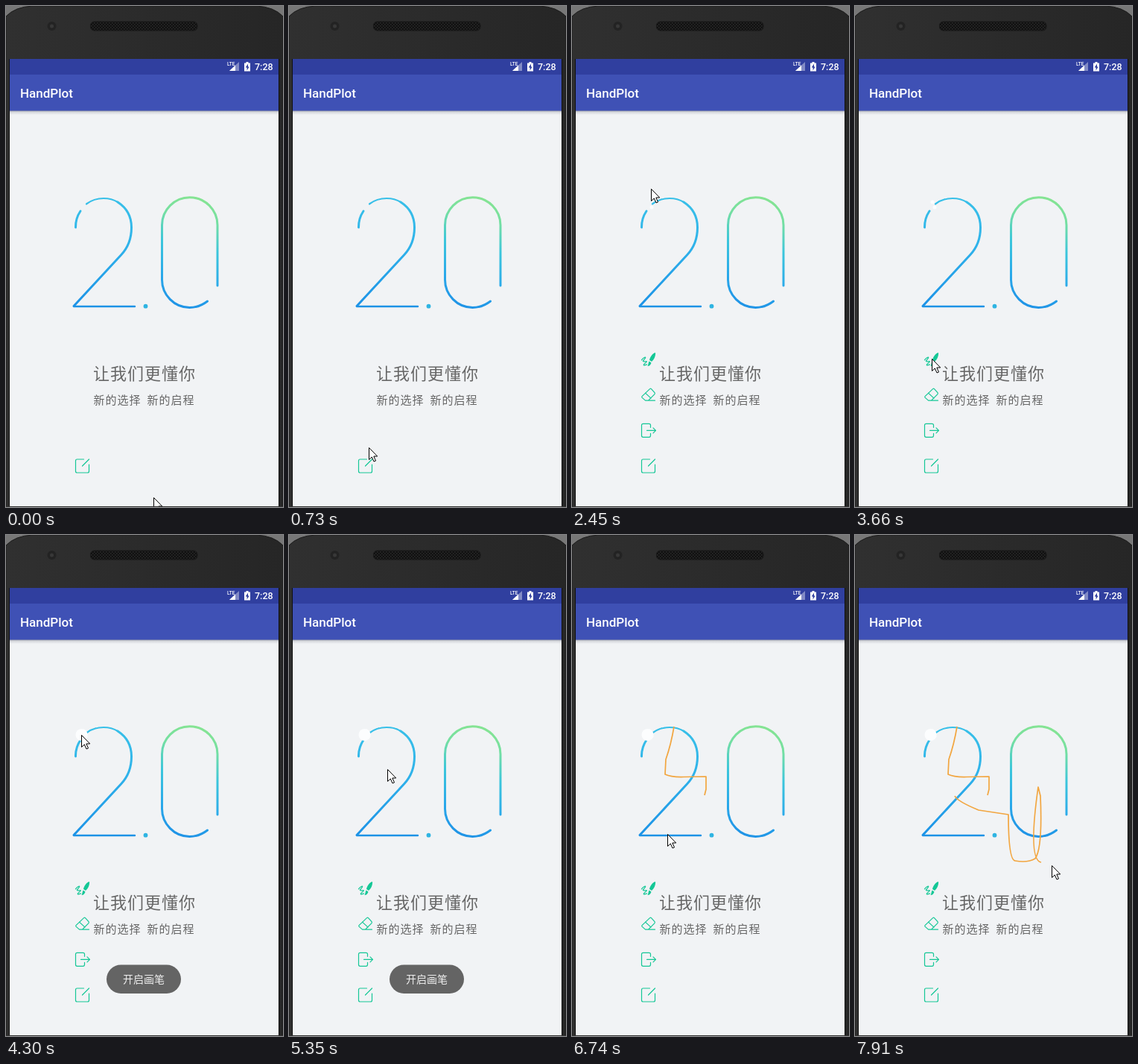
These frames come from a looping animation (372 by 672 pixels, 8 s). An HTML page:

```html
<!DOCTYPE html>
<html lang="zh-CN">
<head>
<meta charset="utf-8">
<style>
  html, body { margin: 0; width: 100%; height: 100%; overflow: hidden; background: #2b2b2b; }
  svg { display: block; width: 372px; height: 672px; }
  .ui { font-family: Roboto, sans-serif; font-weight: 500; fill: #fff; }
  .cjk { font-family: "Noto Sans CJK SC", "Noto Sans CJK", sans-serif; }
  .slogan { font-weight: 300; letter-spacing: 1px; fill: #666; }
  .logo { fill: none; stroke-width: 3; stroke-linecap: round; stroke-linejoin: round; }
  .icon { fill: none; stroke: #14c796; stroke-width: 1.2; stroke-linecap: round; stroke-linejoin: round; }
  .ink { fill: none; stroke: #f2a640; stroke-width: 1.7; stroke-linejoin: round; }
</style>
</head>
<body>
<svg viewBox="0 0 372 672">
  <defs>
    <linearGradient id="body">
      <stop stop-color="#303030"/><stop offset="1" stop-color="#262626"/>
    </linearGradient>
    <linearGradient id="shade" x2="0" y2="1">
      <stop stop-color="#8f919b"/><stop offset=".35" stop-color="#d3d5da"/><stop offset="1" stop-color="#f1f3f5"/>
    </linearGradient>
    <linearGradient id="two" gradientUnits="userSpaceOnUse" x1="0" y1="257" x2="0" y2="404">
      <stop stop-color="#38c0e8"/><stop offset=".45" stop-color="#2fb2ea"/><stop offset="1" stop-color="#1c92e6"/>
    </linearGradient>
    <linearGradient id="zero" gradientUnits="userSpaceOnUse" x1="264" y1="257" x2="232" y2="404">
      <stop stop-color="#86e492"/><stop offset=".2" stop-color="#74dfa2"/><stop offset=".45" stop-color="#3cc6dc"/>
      <stop offset=".75" stop-color="#2aa9ea"/><stop offset="1" stop-color="#1f93e6"/>
    </linearGradient>
    <pattern id="mesh" width="4" height="4" patternUnits="userSpaceOnUse">
      <rect width="4" height="4" fill="#111"/><path d="M0 0h1.5v1.5H0zM2 2h1.5v1.5H2z" fill="#2c2c2c"/>
    </pattern>
  </defs>

  <!-- Phone -->
  <rect width="372" height="672" fill="#777"/>
  <path d="M0 14Q12 1 36 0H336Q360 1 372 14V672H0z" fill="url(#body)" stroke="#1a1a1a"/>
  <path d="M4.500 71V672M366.500 71V672" stroke="#111"/>
  <circle cx="61.500" cy="27" r="6" fill="#232323"/>
  <circle cx="61.500" cy="27" r="2.500" fill="#383838"/>
  <rect x="113.500" y="21" width="143.500" height="12" rx="5" fill="url(#mesh)" stroke="#171717"/>

  <!-- Screen -->
  <rect x="5" y="71" width="361" height="600" fill="#f1f3f5"/>
  <rect x="5" y="140" width="361" height="6" fill="url(#shade)"/>
  <rect x="5" y="71" width="361" height="21.500" fill="#303f9f"/>
  <rect x="5" y="92" width="361" height="48.500" fill="#3f51b5"/>
  <text class="ui" x="19" y="123" font-size="17">HandPlot</text>
  <text class="ui" x="334" y="86" font-size="12.500">7:28</text>
  <text class="ui" x="297" y="80" font-size="6.500">LTE</text>
  <path d="M300 87L313 75V87z" fill="#fff" opacity=".4"/>
  <path d="M300 87L308 79.600V87z" fill="#fff"/>
  <path d="M320 76.500h2.500V75h3v1.500h2.500V87.500h-8z" fill="#fff"/>
  <path d="M325 77.500l-3.300 5h1.900v4l3-5h-1.600z" fill="#303f9f"/>

  <g class="logo">
    <g stroke="url(#two)">
      <path d="M93.500 297A38 38 0 0 1 100 275"/>
      <path d="M108 265.500Q118 258 131 258Q142 258 150 263" stroke-width="2.200"/>
      <path d="M150 263Q168.500 275 168.500 297C168.500 313 163 325 154.500 334L91 402.500"/>
      <path d="M91 403H173" stroke-width="2.400"/>
    </g>
    <path stroke="url(#zero)" d="M284 375V294A37.200 37.200 0 0 0 209.500 294V367A37.200 37.200 0 0 0 246.500 404.500C256 404.500 264 401 270.500 396"/>
  </g>
  <circle cx="187.500" cy="402.700" r="2.900" fill="#2fb4e2"/>
  <g class="cjk slogan">
    <text x="117" y="501" font-size="22">让我们更懂你</text>
    <g font-size="15"><text x="117.500" y="534">新的选择</text><text x="189.500" y="534">新的启程</text></g>
  </g>

  <g fill="#fcfdfe">
    <circle class="erased" data-at="2180" cx="107" cy="270" r="2.500"/>
    <circle class="erased" data-at="2840" cx="104" cy="263" r="2.500"/>
    <circle class="erased" data-at="4260" cx="101.500" cy="268" r="8"/>
  </g>
  <path class="ink" data-from="6040" data-to="6575" pathLength="1" d="M137 257Q133 281 126 301L125 321Q133 325 150 324.500L180 324V341L178 349"/>
  <path class="ink" data-from="7130" data-to="7750" pathLength="1" d="M134 350Q137 357 166 369L206 375Q206 436 215 437Q232 440 242 434Q252 420 249 350L246 338Q232 436 250 439"/>

  <!-- Menu icons, drawn around their centres -->
  <g class="icon">
    <g class="item" data-slot="3">
      <path d="M-9 1C-7-2-3-4-4-2S-9 3-6 3S-1 2-3 4S-8 8-5 8L-2 7"/>
      <path d="M9.500-9C5-8 2-2 1.500 1L4.500 3C8 0 10-5 9.500-9zM1 2.500L4 4.500C3 7.500 1.500 9-1 9C0 7 0 5 1 2.500z" fill="#14c796" stroke="none"/>
    </g>
    <g class="item" data-slot="2">
      <path d="M-8.500 2L2-8Q3-9 4-8L8.500-3Q9-2 8.500-1L0 7.500H-4L-8.500 3.500Q-9 2.700-8.500 2zM-4-2.500L3.500 4.500M0 7.500H9"/>
    </g>
    <g class="item" data-slot="1">
      <path d="M3-4V-7Q3-9 1-9H-7Q-9-9-9-7V7Q-9 9-7 9H1Q3 9 3 7V4M-2 0H10M6.500-3.500L10 0L6.500 3.500"/>
    </g>
    <g class="item" data-slot="0">
      <path d="M2-9H-7Q-9-9-9-7V7Q-9 9-7 9H7Q9 9 9 7V-2M0 0L9-9"/>
    </g>
  </g>

  <g id="toast">
    <rect x="135" y="576.500" width="100" height="38.500" rx="19.250" fill="#646464"/>
    <text class="cjk" x="185" y="601" font-size="14" fill="#eee" text-anchor="middle">开启画笔</text>
  </g>
  <path id="cursor" d="M.5.500V16.500L4.300 13L7 19L9.500 18L6.800 12H11.700z" fill="#fff" stroke="#000"/>
  <path d="M0 671.500H372" stroke="#333"/>
</svg>
<script>
const LOOP = 8000, REFRESH = LOOP / 60;
const all = selector => [...document.querySelectorAll(selector)];
const clamp = v => Math.max(0, Math.min(1, v));
const progress = (t, from, to) => clamp((t - from) / (to - from));
const ease = p => p * p * (3 - 2 * p);
const overshoot = p => (p - 1) ** 2 * (3 * p - 1) + 1;
const mix = (a, b, p) => a + (b - a) * p;

const items = all('.item'), erased = all('.erased');
const toast = document.getElementById('toast');
const cursor = document.getElementById('cursor');
const strokes = all('.ink').map(path => ({
  path, from: +path.dataset.from, to: +path.dataset.to,
  at: p => path.getPointAtLength(path.getTotalLength() * p)
}));

// Places where the pointer stops; the ends of each pen stroke are stops too
const stop = (t, x, y) => ({ t, x, y });
const stops = [
  stop(0, 198, 659), stop(400, 108, 623),                      // menu button
  stop(1200, 106, 505), stop(2390, 106, 245),                  // logo
  stop(3000, 140, 290), stop(3590, 103, 473), stop(3900, 103, 473), // brush
  stop(4260, 101, 268), stop(4830, 130, 208), stop(5330, 132, 314),
  stop(6660, 128, 401), stop(7860, 264, 443), stop(LOOP, 264, 443),
  ...strokes.flatMap(({ from, to, at }) =>
    [[from, at(0)], [to, at(1)]].map(([t, p]) => stop(t, p.x, p.y)))
].sort((a, b) => a.t - b.t);

function pointerAt(t) {
  const stroke = strokes.find(s => t > s.from && t < s.to);
  if (stroke) return stroke.at(progress(t, stroke.from, stroke.to));
  const next = stops.findIndex(s => s.t > t);
  const a = stops[next - 1], b = stops[next];
  const p = ease(progress(t, a.t, b.t));
  return { x: mix(a.x, b.x, p), y: mix(a.y, b.y, p) };
}

function draw(t) {
  const open = progress(t, 700, 1190);
  for (const item of items) {
    const slot = +item.dataset.slot;
    item.setAttribute('transform', `translate(102.5 ${617 - slot * 47.7 * overshoot(open)})`);
    item.setAttribute('opacity', slot ? clamp(open * 2) : 1);
  }
  for (const spot of erased) spot.style.display = t >= spot.dataset.at ? '' : 'none';
  for (const { path, from, to } of strokes) {
    const p = progress(t, from, to);
    path.style.display = p ? '' : 'none';
    path.setAttribute('stroke-dasharray', p < 1 ? `${p} 2` : 'none');
  }
  toast.setAttribute('opacity', progress(t, 3940, 4260) * (1 - progress(t, 6010, 6290)));
  const { x, y } = pointerAt(t);
  cursor.setAttribute('transform', `translate(${Math.round(x)} ${Math.round(y)})`);
}

// The screen is refreshed at a low, steady rate
function tick() {
  const t = performance.now() % LOOP;
  draw(Math.floor(t / REFRESH) * REFRESH);
  requestAnimationFrame(tick);
}
tick();
</script>
</body>
</html>
```
